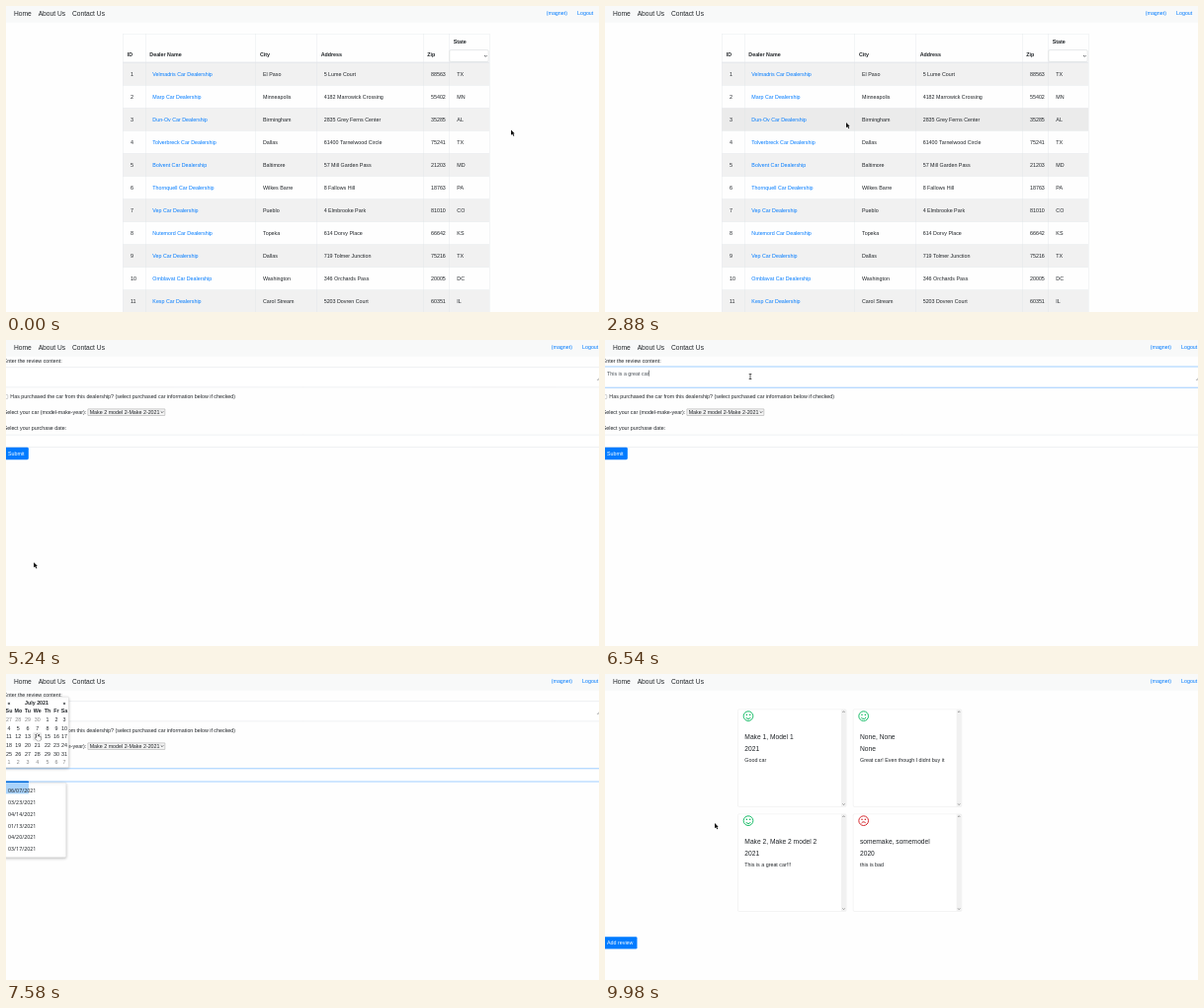
An HTML page with a canvas that plays this animation: 600x310 px, repeating every 10 s.

```html
<!DOCTYPE html>
<html lang="en">
<head>
<meta charset="utf-8">
<title>Dealer reviews</title>
<style>
html, body { margin: 0; width: 100%; height: 100%; overflow: hidden; background: #fefefe; }
canvas { display: block; width: 600px; height: 310px; }
</style>
</head>
<body>
<canvas id="stage" width="600" height="310"></canvas>
<script>
const ctx = document.getElementById('stage').getContext('2d');
const LOOP = 10000;
const SANS = '"Liberation Sans", Arial, sans-serif';
const INK = '#212529', BLUE = '#007bff', DARK_BLUE = '#0069d9', LINE = '#dee2e6', GRAY = '#495057';
const LEFT = -7; // the form row hangs slightly off the left edge

// Moments at which the screen changes, in ms
const OPEN_DEALER = 4680, OPEN_FORM = 5120, FOCUS_TEXT = 5580, BANGS = 6660, TICK = 6960,
  OPEN_PICKER = 7200, PICK_DATE = 7620, PRESS = 8160, SUBMITTED = 8380;

// Pointer path: time, x, y in stage pixels
const PATH = [
  [20, 511, 125.5], [620, 244, 118], [4420, 244, 118], [4600, 180, 114],
  [4720, 180, 114], [5040, 13, 271], [5160, 13, 271], [5400, 70, 98], [5460, 70, 98],
  [5560, 147, 37], [6780, 147, 37], [6920, 1, 57], [7000, 1, 57], [7160, 30, 101],
  [7240, 30, 101], [7440, 31, 61], [7660, 31, 61], [7940, 13, 112], [8480, 13, 112],
  [9120, 86, 262], [9400, 86, 262], [9680, 180, 194], [9980, 111, 151]
];

const DEALERS = [
  ['Velmadris', 'El Paso', '5 Lume Court', '88563', 'TX'],
  ['Marp', 'Minneapolis', '4182 Marrowick Crossing', '55402', 'MN'],
  ['Dun-Ov', 'Birmingham', '2835 Grey Ferns Center', '35285', 'AL'],
  ['Tolverbreck', 'Dallas', '61400 Tarnelwood Circle', '75241', 'TX'],
  ['Bolvent', 'Baltimore', '57 Mill Garden Pass', '21203', 'MD'],
  ['Thornquell', 'Wilkes Barre', '8 Fallows Hill', '18763', 'PA'],
  ['Vep', 'Pueblo', '4 Elmbrooke Park', '81010', 'CO'],
  ['Nutemord', 'Topeka', '614 Dorvy Place', '66642', 'KS'],
  ['Vep', 'Dallas', '719 Tolmer Junction', '75216', 'TX'],
  ['Omblavat', 'Washington', '346 Orchards Pass', '20005', 'DC'],
  ['Kesp', 'Carol Stream', '5203 Dovren Court', '60351', 'IL']
];

const REVIEWS = [
  ['Make 1, Model 1', '2021', 'Good car', true],
  ['None, None', 'None', 'Great car! Even though I didnt buy it', true],
  ['Make 2, Make 2 model 2', '2021', 'This is a great car!!!', true],
  ['somemake, somemodel', '2020', 'this is bad', false]
];

function rect(x, y, w, h, fill) {
  ctx.fillStyle = fill;
  ctx.fillRect(x, y, w, h);
}

function box(x, y, w, h, fill, stroke, r = 4) {
  ctx.beginPath();
  ctx.roundRect(x + .5, y + .5, w - 1, h - 1, r);
  if (fill) { ctx.fillStyle = fill; ctx.fill(); }
  if (stroke) { ctx.strokeStyle = stroke; ctx.lineWidth = 1; ctx.stroke(); }
}

function ring(x, y, w, h, color) {
  ctx.beginPath();
  ctx.roundRect(x - 1.6, y - 1.6, w + 3.2, h + 3.2, 6);
  ctx.strokeStyle = color;
  ctx.lineWidth = 3.2;
  ctx.stroke();
}

// cy is the middle of the capitals
function text(s, x, cy, { size = 16, color = INK, bold = false, align = 'left', font = SANS } = {}) {
  ctx.font = (bold ? 'bold ' : '') + size + 'px ' + font;
  ctx.textAlign = align;
  ctx.fillStyle = color;
  ctx.fillText(s, x, cy + size * .36);
  return ctx.measureText(s).width;
}

function polyline(points, color, width) {
  ctx.beginPath();
  points.forEach(([x, y]) => ctx.lineTo(x, y));
  ctx.strokeStyle = color;
  ctx.lineWidth = width;
  ctx.stroke();
}

const chevron = (x, y) => polyline([[x - 4, y - 2], [x, y + 2], [x + 4, y - 2]], INK, 2);

function pointerAt(t) {
  if (t <= PATH[0][0]) return PATH[0].slice(1);
  const i = PATH.findIndex(p => p[0] > t);
  if (i < 0) return PATH[PATH.length - 1].slice(1);
  const [t0, x0, y0] = PATH[i - 1], [t1, x1, y1] = PATH[i];
  const u = (t - t0) / (t1 - t0), e = u * u * (3 - 2 * u);
  return [x0 + (x1 - x0) * e, y0 + (y1 - y0) * e];
}

function drawNav(shift) {
  rect(0, 0, 1800, 50, '#f8f9f9');
  text('Home', 24, 23, { size: 20 });
  text('About Us', 98, 23, { size: 20 });
  text('Contact Us', 201, 23, { size: 20 });
  text('(magnet)', 1640 + shift, 22, { color: BLUE });
  text('Logout', 1734 + shift, 22, { color: BLUE });
}

function drawTable(mx, my) {
  const cols = [355, 423, 758, 943, 1266, 1345, 1467];
  const heads = ['ID', 'Dealer Name', 'City', 'Address', 'Zip', 'State'];
  const top = 172, rowH = 69.1;
  const hover = mx > 355 && mx < 1467 ? Math.floor((my - top) / rowH) : -1;
  DEALERS.forEach(([name, ...rest], i) => {
    const y = top + i * rowH, cy = y + 34.5;
    if (i === hover) rect(355, y, 1112, rowH, '#ebebeb');
    else if (i % 2 === 0) rect(355, y, 1112, rowH, '#f1f1f1');
    rect(355, y, 1112, 1, LINE);
    text(i + 1, cols[0] + 23, cy);
    const over = i === hover && mx > 445 && mx < 610;
    const w = text(name + ' Car Dealership', cols[1] + 22, cy, { color: over ? '#0056b3' : BLUE });
    if (over) rect(cols[1] + 22, cy + 8, w, 1, '#0056b3');
    rest.forEach((s, k) => text(s, cols[k + 2] + (k < 2 ? 22 : 24), cy));
  });
  heads.forEach((s, i) => text(s, cols[i] + 13, i === 5 ? 108 : 146, { bold: true }));
  cols.forEach(x => rect(x, 84, 1, 846, LINE));
  rect(355, 84, 1112, 1, LINE);
  rect(355, 170, 1112, 2, LINE);
  box(1346, 133, 119, 37, '#fff', '#b5bbc0');
  chevron(1456, 152);
}

function drawFace(x, y, happy) {
  const color = happy ? '#18bd68' : '#d62a30';
  ctx.strokeStyle = color;
  ctx.lineWidth = 3;
  ctx.beginPath();
  ctx.arc(x, y, 14.5, 0, 7);
  ctx.stroke();
  ctx.beginPath();
  if (happy) ctx.arc(x, y + 1, 7.5, .4, Math.PI - .4);
  else ctx.arc(x, y + 11, 7.5, Math.PI + .5, -.5);
  ctx.stroke();
  rect(x - 7, y - 6, 4, 4, color);
  rect(x + 3, y - 6, 4, 4, color);
}

function drawCard([title, year, body, happy], i) {
  const x = 403 + (i % 2) * 350, y = 107 + Math.floor(i / 2) * 318;
  box(x, y, 330, 297, '#fff', '#dcdcdc');
  rect(x + 314, y + 1, 15, 295, '#f1f1f1');
  polyline([[x + 318, y + 10], [x + 321.5, y + 6], [x + 325, y + 10]], '#777', 2);
  polyline([[x + 318, y + 287], [x + 321.5, y + 291], [x + 325, y + 287]], '#777', 2);
  drawFace(x + 32, y + 21, happy);
  text(title, x + 21, y + 83, { size: 20 });
  text(year, x + 21, y + 119, { size: 20 });
  text(body, x + 21, y + 154);
}

function drawButton(label, y, w, active, focus) {
  if (focus) ring(LEFT, y, w, 38, 'rgba(38,143,255,.5)');
  box(LEFT, y, w, 38, active ? DARK_BLUE : BLUE);
  text(label, LEFT + 13, y + 18, { color: '#fff' });
}

function drawReviews(list, mx, my) {
  list.forEach(drawCard);
  drawButton('Add review', 798, 105, mx < 98 && my > 798 && my < 836);
}

function drawField(y, h, focus) {
  if (focus) ring(LEFT, y, 1815, h, '#bfdeff');
  box(LEFT, y, 1815, h, '#fff', focus ? '#80bdff' : '#ced4da');
}

function typed(t) {
  const base = 'This is a great car';
  const n = Math.max(0, Math.min(base.length, Math.floor((t - 5640) / 40)));
  const bangs = Math.max(0, Math.min(3, Math.floor((t - BANGS) / 40) + 1));
  return base.slice(0, n) + '!'.repeat(bangs);
}

function drawForm(t, mx, my) {
  const writing = t >= FOCUS_TEXT && t < TICK;
  const dating = t >= OPEN_PICKER && t < PRESS - 200;
  const pressed = t >= PRESS;
  const overSubmit = mx < 69 && my > 326 && my < 364;

  text('Enter the review content:', LEFT, 62);
  drawField(82, 62, writing);
  const w = text(typed(t), 6, 101, { color: GRAY });
  if (writing) rect(6 + w, 92, 1.5, 18, INK);
  if (t < PRESS - 200) {
    polyline([[1794, 123], [1801, 115]], '#777', 1.5);
    polyline([[1798, 123], [1802, 119]], '#777', 1.5);
  }

  const ticked = t >= TICK;
  box(-7, 166, 13, 13, ticked ? '#0075ff' : '#fff', ticked ? '#0075ff' : '#767676', 2);
  if (ticked) polyline([[-4, 172], [-1, 175], [4, 169]], '#fff', 2);
  text('Has purchased the car from this dealership? (select purchased car information below if checked)', 13, 172);

  text('Select your car (model-make-year):', LEFT, 219);
  box(248, 209, 235, 21, '#f2f2f2', '#767676', 1);
  text('Make 2 model 2-Make 2-2021', 254, 219);
  chevron(474, 219);

  text('Select your purchase date:', LEFT, 267);
  drawField(288, 38, dating);
  if (t >= PICK_DATE) text('07/14/2021', 6, 306, { color: GRAY });
  drawButton('Submit', 326, 76, pressed || overSubmit, pressed);

  if (t >= OPEN_PICKER && t < PICK_DATE) {
    drawSuggestions();
    drawPicker(mx, my);
  }
}

function panel(x, y, w, h, fill) {
  ctx.save();
  ctx.shadowColor = 'rgba(0,0,0,.25)';
  ctx.shadowBlur = 3;
  ctx.shadowOffsetY = 1;
  box(x, y, w, h, fill, '#d4d4d4');
  ctx.restore();
}

function drawSuggestions() {
  const dates = ['06/07', '03/23', '04/14', '01/13', '04/20', '03/17'];
  panel(-8, 330, 191, 228, '#fff');
  rect(0, 330, 69, 34, '#a9d3fb');
  rect(0, 326, 69, 4, DARK_BLUE);
  dates.forEach((d, i) => text(d + '/2021', 6, 354 + i * 35.6, { font: '"Noto Sans", sans-serif' }));
}

function drawPicker(mx, my) {
  const xs = [9, 37, 66, 95, 126, 153, 177];
  const mid = { align: 'center', bold: true };
  panel(-12, 69, 203, 216, '#fff');
  text('«', 9, 87, mid);
  text('July 2021', 93, 86, mid);
  text('»', 177, 87, mid);
  ['Su', 'Mo', 'Tu', 'We', 'Th', 'Fr', 'Sa'].forEach((d, i) => text(d, xs[i], 112, mid));
  for (let i = 0; i < 42; i++) {
    const day = i - 3, x = xs[i % 7], y = 138 + Math.floor(i / 7) * 26;
    if (Math.abs(mx - x) < 14 && Math.abs(my + 4 - y) < 13) box(x - 14, y - 13, 28, 26, '#e9e9e9');
    const inMonth = day >= 1 && day <= 31;
    const label = day < 1 ? day + 30 : inMonth ? day : day - 31;
    text(label, x, y, { align: 'center', color: inMonth ? INK : '#858585' });
  }
}

function shape(points, x, y, fill, stroke) {
  ctx.beginPath();
  points.forEach(([px, py]) => ctx.lineTo(x + px, y + py));
  ctx.closePath();
  ctx.lineJoin = 'round';
  ctx.strokeStyle = stroke;
  ctx.lineWidth = 2;
  ctx.stroke();
  ctx.fillStyle = fill;
  ctx.fill();
}

const ARROW = [[0, 0], [0, 16], [4, 13], [7, 19], [10, 18], [7, 12], [11, 11]];
const HAND = [[0, 0], [3, 0], [3, 6], [13, 8], [13, 15], [10, 20], [2, 20], [-5, 12], [-4, 9], [0, 11]];

function pointerKind(t, x, y) {
  if (t < OPEN_DEALER) return x < 205 ? 'hand' : 'arrow';
  if (t < OPEN_FORM) return y > 266 && x < 33 ? 'hand' : 'arrow';
  if (t < SUBMITTED) {
    if (t >= OPEN_PICKER && t < PICK_DATE && y < 95) return 'hand';
    if (y > 109 && y < 122 && x < 23) return 'hand';
    return (y > 28 && y < 48) || (y > 96 && y < 109) ? 'beam' : 'arrow';
  }
  return 'arrow';
}

function drawPointer(kind, x, y) {
  if (kind === 'hand') shape(HAND, x, y, '#fff', '#222');
  else if (kind === 'arrow') shape(ARROW, x, y, '#111', '#fff');
  else {
    rect(x - 1, y - 7, 2, 15, '#111');
    rect(x - 4, y - 8, 8, 2, '#111');
    rect(x - 4, y + 7, 8, 2, '#111');
  }
}

function draw(t) {
  const [x, y] = pointerAt(t), mx = x * 3, my = y * 3;
  // Layout is an 1800 x 930 page shown at a third of its size
  ctx.setTransform(1 / 3, 0, 0, 1 / 3, 0, 0);
  rect(0, 0, 1800, 930, '#fefefe');
  drawNav(t < OPEN_DEALER ? 0 : 15);
  if (t < OPEN_DEALER) drawTable(mx, my);
  else if (t < OPEN_FORM) drawReviews(REVIEWS.filter((_, i) => i !== 2), mx, my);
  else if (t < SUBMITTED) drawForm(t, mx, my);
  else drawReviews(REVIEWS, mx, my);
  drawPointer(pointerKind(t, x, y), mx, my);
}

const start = performance.now();
function tick() {
  draw((performance.now() - start) % LOOP);
  requestAnimationFrame(tick);
}
tick();
</script>
</body>
</html>
```
